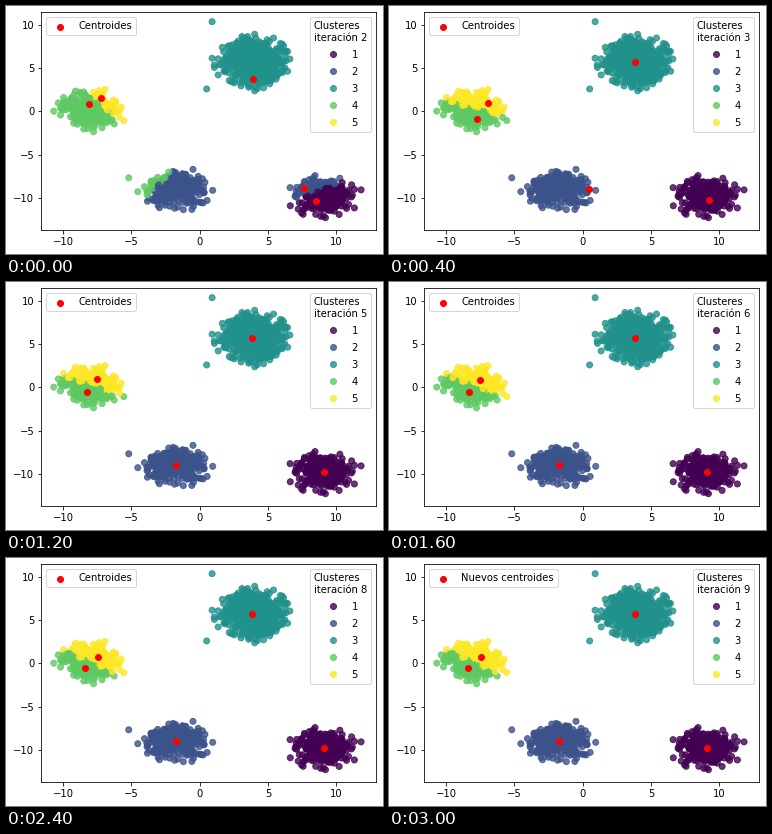
Recreate the animation shown at these times as a matplotlib script. Size 377x248 px, loop 3200 ms.

```python
import numpy as np
import matplotlib.pyplot as plt
from matplotlib.animation import FuncAnimation

W, H, DPI = 377, 248, 72
FIRST_ITER, STEPS, INTERVAL = 2, 16, 200
rng = np.random.default_rng(7)


def blob(x, y, sd, n, cut=2.9):
    """Normal cloud whose radius never exceeds `cut` deviations."""
    u = rng.random(n)
    r = np.sqrt(-2 * np.log(1 - u * (1 - np.exp(-cut**2 / 2))))
    t = rng.uniform(0, 2 * np.pi, n)
    return np.c_[x + sd[0] * r * np.cos(t), y + sd[1] * r * np.sin(t)]


extremes = [(0.9, 10.4), (0.5, 2.6), (-5.2, -7.7), (11.8, -9.1)]
points = np.vstack([
    blob(-7.95, 0.25, (0.97, 0.97), 300),
    blob(3.82, 5.73, (1.02, 1.18), 800),
    blob(-1.72, -9.0, (1.0, 0.93), 300),
    blob(9.1, -9.8, (0.95, 0.93), 300),
    extremes,
])

# Clusters 1 to 5: two big moves, then a slow drift to the resting place.
start = [(8.5, -10.35), (7.62, -8.85), (3.9, 3.77), (-8.1, 0.87), (-7.23, 1.57)]
second = [(9.23, -10.25), (0.47, -9.0), (3.82, 5.73), (-7.72, -0.87), (-6.93, 1.0)]
settled = [(9.1, -9.8), (-1.72, -9.0), (3.82, 5.73)]
near = np.array(settled + [(-8.24, -0.55), (-7.58, 1.0)])
rest = np.array(settled + [(-8.4, -0.55), (-7.48, 0.73)])


def centers(step):
    if step < 2:
        return np.array((start, second)[step])
    return near + (rest - near) * min(1, (step - 2) / 3.5)


def assign(step):
    gaps = points[:, None, :] - centers(step)
    return (gaps**2).sum(axis=2).argmin(axis=1) + 1


plt.rcParams.update({"font.family": "DejaVu Sans", "font.size": 10})
fig = plt.figure(figsize=(W / DPI, H / DPI), dpi=DPI, facecolor="white")
ax = fig.add_axes([35.3 / W, 24.2 / H, 334.8 / W, 217.44 / H])
ax.set(xlim=(-11.6, 12.9), ylim=(-13.73, 11.48),
       xticks=range(-10, 11, 5), yticks=range(-10, 11, 5))

cloud = ax.scatter(*points.T, c=assign(0), cmap="viridis", vmin=1, vmax=5,
                   alpha=0.8)
marks = ax.scatter(*centers(0).T, c="red", label="Centroides")
key = ax.legend(*cloud.legend_elements(), loc="upper right", title="Clusteres")
ax.add_artist(key)
caption = ax.legend(handles=[marks], loc="upper left")


def update(i):
    step, moved = divmod(i, 2)
    cloud.set_array(assign(step))
    marks.set_offsets(centers(step + moved))
    key.get_title().set_text(f"Clusteres\niteración {FIRST_ITER + step}")
    caption.get_texts()[0].set_text(
        "Nuevos centroides" if moved else "Centroides")
    return cloud, marks, key, caption


anim = FuncAnimation(fig, update, frames=STEPS, interval=INTERVAL,
                     repeat=True, repeat_delay=0, blit=False)
plt.show()
```
